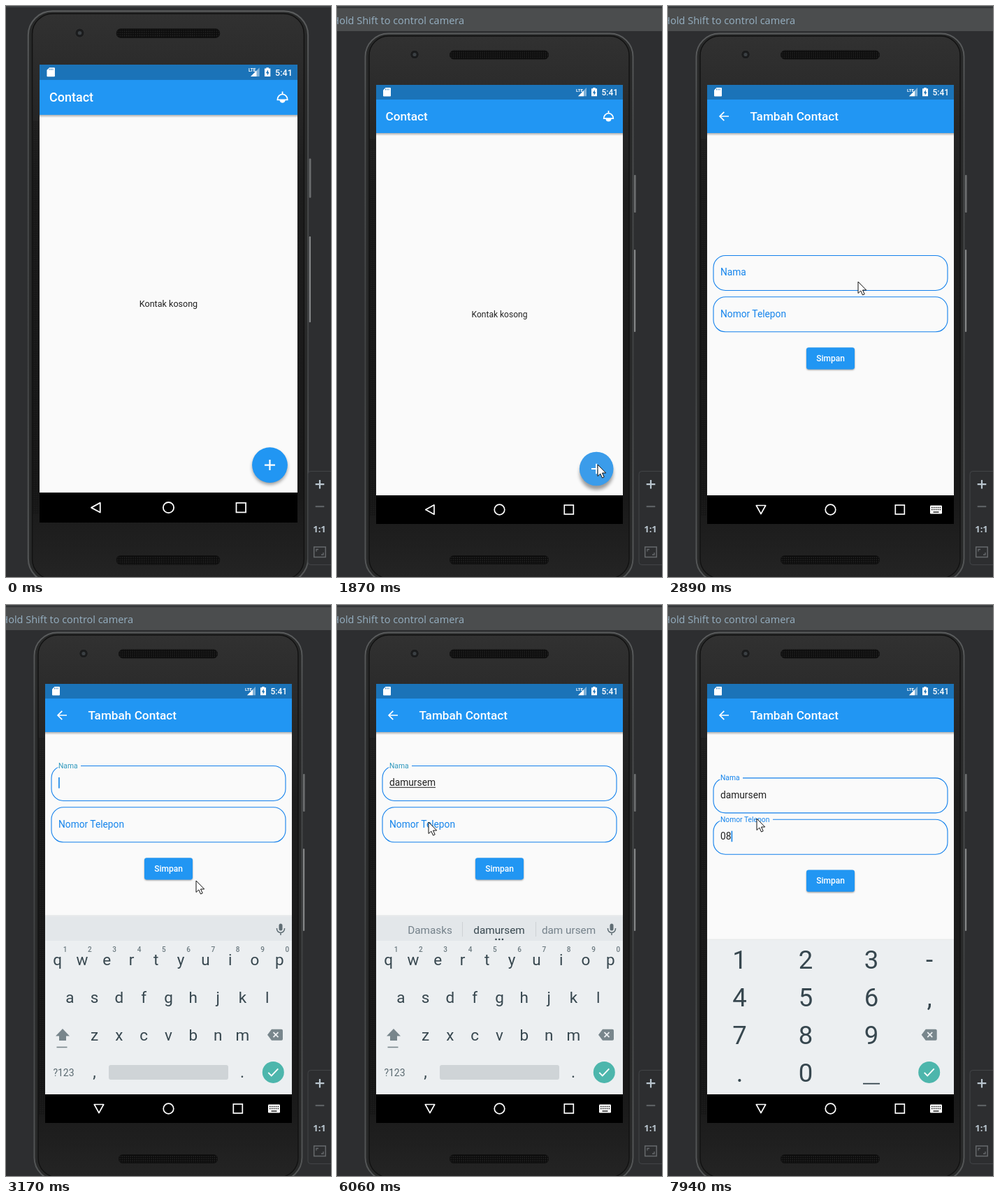
Write an HTML page that moves like this. It is 465x818 px and loops after 8000 ms.

```html
<!DOCTYPE html>
<html lang="id">
<head>
<meta charset="utf-8">
<title>Contact app</title>
<style>
html, body { margin: 0; width: 100%; height: 100%; overflow: hidden; background: #2d2e30; }
svg { display: block; width: 100vw; height: 100vh; font-family: Roboto, sans-serif; }
.mid { text-anchor: middle; }
.bold { font-weight: 500; }
.title { font-size: 17.18px; font-weight: 500; fill: #fff; }
.input { font-size: 13.75px; fill: #212121; }
.line { fill: none; stroke: #fff; stroke-width: 1.7; }
.ui { font-family: 'Open Sans', sans-serif; }
</style>
</head>
<body>
<svg viewBox="0 0 465 818" xmlns="http://www.w3.org/2000/svg">
<defs>
  <linearGradient id="body" x1="0" y1="0" x2="0" y2="1">
    <stop offset="0" stop-color="#313131"/><stop offset=".1" stop-color="#2b2b2b"/>
    <stop offset=".3" stop-color="#1d1d1d"/><stop offset=".85" stop-color="#191919"/><stop offset="1" stop-color="#242424"/>
  </linearGradient>
  <linearGradient id="rim" x1="0" y1="0" x2="0" y2="1">
    <stop offset="0" stop-color="#5a5c5d"/><stop offset=".15" stop-color="#4a4c4d"/>
    <stop offset=".6" stop-color="#404243"/><stop offset="1" stop-color="#545657"/>
  </linearGradient>
  <linearGradient id="fade" x1="0" y1="0" x2="0" y2="1">
    <stop offset="0" stop-color="#000" stop-opacity=".3"/><stop offset="1" stop-color="#000" stop-opacity="0"/>
  </linearGradient>
  <pattern id="dots" width="3" height="3" patternUnits="userSpaceOnUse">
    <rect width="3" height="3" fill="#0c0c0c"/><rect x=".5" y=".5" width="1.4" height="1.4" fill="#2a2a2a"/>
  </pattern>
  <filter id="soft" x="-30%" y="-30%" width="160%" height="170%"><feGaussianBlur stdDeviation="2.6"/></filter>
  <filter id="soft1" x="-10%" y="-20%" width="120%" height="150%"><feGaussianBlur stdDeviation="1"/></filter>
  <clipPath id="app"><rect x="56" y="113" width="353" height="588"/></clipPath>
  <g id="bar">
    <rect x="56" y="113" width="353" height="588" fill="#fafafa"/>
    <rect x="56" y="182" width="353" height="4" fill="url(#fade)"/>
    <rect x="56" y="133" width="353" height="49" fill="#2196f3"/>
    <rect x="56" y="113" width="353" height="21" fill="#1b73b8"/>
  </g>
  <g id="erase">
    <path d="M-11 0L-5-8H9Q11-8 11-6V6Q11 8 9 8H-5Z" fill="#78868c"/>
    <path d="M-2.5-3.5L4.5 3.5M4.5-3.5L-2.5 3.5" stroke="#eceff1" stroke-width="1.8"/>
  </g>
  <g id="done">
    <circle r="15.5" fill="#4db6ac"/>
    <path d="M-7 .5L-2.5 5L7-5" fill="none" stroke="#fff" stroke-width="1.9"/>
  </g>
</defs>

<rect width="465" height="818" fill="#2d2e30"/>
<rect width="465" height="2" fill="#3d4042"/>
<g id="hint">
  <rect y="3" width="465" height="33" fill="#4b4d4e"/>
  <text x="182" y="26" text-anchor="end" font-size="14.5" fill="#96b0c2" class="ui">Hold Shift to control camera</text>
</g>

<g id="phone">
  <rect x="425" y="242" width="2.6" height="54" rx="1" fill="#6c6e6f"/>
  <rect x="425" y="349" width="2.2" height="118" rx="1" fill="#858788"/>
  <rect x="40.5" y="39.5" width="383" height="785" rx="33" fill="#282929" stroke="url(#rim)" stroke-width="2"/>
  <rect x="46" y="43" width="372" height="777" rx="28" fill="url(#body)" stroke="#121212" stroke-width="1.4"/>
  <rect x="47" y="190" width="8" height="540" fill="url(#dots)" opacity=".3"/>
  <circle cx="111" cy="69.5" r="6.3" fill="#1b1c1d" stroke="#343434"/>
  <circle cx="111" cy="69.5" r="2.6" fill="#3b4044"/>
  <rect x="161.5" y="64" width="141" height="12" rx="5.5" fill="url(#dots)" stroke="#111"/>
  <rect x="161.5" y="787.5" width="141" height="12" rx="5.5" fill="url(#dots)" stroke="#111"/>

  <g clip-path="url(#app)">
    <g id="home">
      <use href="#bar"/>
      <text x="69.5" y="164" class="title">Contact</text>
      <path d="M388.500 150V153M381.700 161.200A6.800 7.600 0 0 1 395.300 161.200Z" class="line"/>
      <path d="M384.500 161.500H392.500A4 4 0 0 1 384.500 161.500Z" fill="#fff"/>
      <text x="232.5" y="445.5" class="mid" font-size="12.03" fill="#212121">Kontak kosong</text>
      <circle id="fabShade" cx="371.2" cy="666" r="24" fill="#000" opacity=".38" filter="url(#soft)"/>
      <circle cx="371.2" cy="663" r="24.3" fill="#2196f3"/>
      <circle id="ripple" cx="371.2" cy="663" fill="#b0b8c0"/>
      <path d="M371.200 655.800V670.200M364 663H378.400" stroke="#fff" stroke-width="2.1"/>
    </g>
    <g id="form">
      <use href="#bar"/>
      <path d="M87 158H74.500M80.300 151.800L74.100 158L80.300 164.200" class="line"/>
      <text x="117.6" y="164" class="title">Tambah Contact</text>
      <g id="fields"></g>
    </g>
    <g id="letters"></g>
    <g id="digits"></g>
  </g>

  <g fill="#fff">
    <path d="M69.500 117H76Q77 117 77 118V128.500Q77 129.500 76 129.500H67Q66 129.500 66 128.500V120.500Z"/>
    <path d="M69.500 118.500V120.500M71.800 118.500V120.500M74.100 118.500V120.500" stroke="#1b73b8" stroke-width=".9"/>
    <text x="342" y="122.5" font-size="6.2" font-weight="700">LTE</text>
    <path d="M357 117V129.200H345Z" opacity=".45"/>
    <path d="M353 121.200V129.200H345Z"/>
    <path d="M366.300 117H369.700V118.200H372V129.300H364V118.200H366.300Z"/>
    <path d="M368.800 120L365.800 124.700H367.700V128L370.400 123.400H368.800Z" fill="#1b73b8"/>
    <text x="378.5" y="128" font-size="12" class="bold">5:41</text>
  </g>

  <rect x="56" y="701" width="353" height="41" fill="#000"/>
  <path id="back" d="M126.800 721.500L139 714.800V728.200Z" class="line" stroke-linejoin="round"/>
  <circle cx="232.5" cy="721.5" r="7.3" class="line"/>
  <rect x="325.3" y="715" width="13" height="13" class="line"/>
  <g id="kbIcon">
    <rect x="375" y="715.5" width="17" height="12" rx="1.3" fill="#fff"/>
    <path d="M377 718.500H390.500M377 721.500H390.500" stroke="#000" stroke-width="1.5" stroke-dasharray="1.5 1.4"/>
    <path d="M379.500 725H387.500" stroke="#000" stroke-width="1.3"/>
  </g>
</g>

<g fill="none">
  <rect x="432" y="666.5" width="40" height="134" rx="4" fill="#2d2e30" stroke="#424447"/>
  <path d="M449 679V691.500M442.700 685.200H455.300" stroke="#bac6cf" stroke-width="2.2"/>
  <path d="M442.700 717H455.300" stroke="#5d6164" stroke-width="2.2"/>
  <text x="448.5" y="754.3" class="mid ui" font-size="13" font-weight="700" fill="#bac6cf">1:1</text>
  <rect x="440.7" y="775" width="16.5" height="14.5" stroke="#66696c" stroke-width="1.5"/>
  <path d="M444 781.500V778.500H447M454 783V786H451" stroke="#66696c" stroke-width="1.3"/>
</g>
<path id="mouse" d="M0 0V16.500L3.800 13L6.500 19L9.200 17.800L6.500 12H11.700Z" fill="#fff" stroke="#111" stroke-width="1"/>
</svg>

<script>
const $ = id => document.getElementById(id);
const NS = 'http://www.w3.org/2000/svg';
const LOOP = 8000;

function add(parent, tag, attrs, text) {
  const el = document.createElementNS(NS, tag);
  for (const k in attrs) el.setAttribute(k, attrs[k]);
  if (text) el.textContent = text;
  return parent.appendChild(el);
}
const label = (p, x, y, size, text, fill = '#37474f', more = {}) =>
  add(p, 'text', { x, y, class: 'mid', 'font-size': size, fill, ...more }, text);
const icon = (p, id, x, y) => add(p, 'use', { href: '#' + id, transform: `translate(${x} ${y})` });

// Letter keyboard
const abc = $('letters');
add(abc, 'rect', { x: 56, y: 444, width: 353, height: 2, fill: '#e9ebec' });
add(abc, 'rect', { x: 56, y: 446, width: 353, height: 255, fill: '#eceff1' });
add(abc, 'rect', { x: 56, y: 446, width: 353, height: 35, fill: '#e3e7ea' });
['qwertyuiop', 'asdfghjkl', 'zxcvbnm'].forEach((row, r) => {
  [...row].forEach((c, i) => {
    const x = [73.6, 91.3, 126.6][r] + 35.3 * i;
    label(abc, x, 516 + 54 * r, 22.5, c);
    if (!r) label(abc, x + 11, 496.5, 10, String((i + 1) % 10), '#6c7a80', { 'font-weight': 500 });
  });
});
add(abc, 'path', { d: 'M81 607L91 617.500H86V624H76V617.500H71Z', fill: '#78868c' });
add(abc, 'path', { d: 'M72.500 633.500H87.500', stroke: '#78868c', 'stroke-width': 1.6 });
icon(abc, 'erase', 385, 615.7);
label(abc, 82.5, 675, 14, '?123', '#5b6a71');
label(abc, 126.5, 677, 23, ',');
label(abc, 338, 677, 23, '.');
add(abc, 'rect', { x: 147, y: 659, width: 171, height: 21, rx: 3, fill: '#cfd4d7' });
icon(abc, 'done', 382.3, 669.4);
add(abc, 'rect', { x: 390.5, y: 456.5, width: 5, height: 10, rx: 2.5, fill: '#5f6d74' });
add(abc, 'path', { d: 'M387.500 463V464A5.500 5.500 0 0 0 398.500 464V463M393 469.500V473', fill: 'none', stroke: '#5f6d74', 'stroke-width': 1.5 });
const strip = add(abc, 'g', {});
add(strip, 'path', { d: 'M179.500 454V475M284.500 454V475', stroke: '#cdd2d5' });
for (const x of [227.5, 232.2, 236.9]) add(strip, 'circle', { cx: x, cy: 479, r: 1.3, fill: '#37474f' });
const hints = [133, 232, 331.5].map((x, i) => label(strip, x, 471, 15.3, '', i === 1 ? '#37474f' : '#74818a'));

// Number keyboard
const pad = $('digits');
add(pad, 'rect', { x: 56, y: 478.5, width: 353, height: 2, fill: '#e9ebec' });
add(pad, 'rect', { x: 56, y: 480, width: 353, height: 221, fill: '#eceff1' });
['123-', '456,', '789', '.0'].forEach((row, r) =>
  [...row].forEach((c, i) => label(pad, [102.5, 197, 291, 374][i], 520.7 + 54 * r, 36.5, c)));
add(pad, 'path', { d: 'M279 685.700H303', stroke: '#37474f', 'stroke-width': 1.8 });
icon(pad, 'erase', 373.7, 615.7);
icon(pad, 'done', 373.7, 669.4);

// Form fields, placed for a closed keyboard
const fields = $('fields');
function makeField(top, name, gap) {
  const g = add(fields, 'g', { transform: `translate(0 ${top})` });
  add(g, 'rect', { x: 65, y: 0, width: 335, height: 50, rx: 17.2, fill: 'none', stroke: '#1380ec', 'stroke-width': 1.1 });
  const cut = add(g, 'rect', { x: 72, y: -2, height: 4, fill: '#fafafa' });
  const tag = add(g, 'text', { 'font-size': 13.75 }, name);
  const text = add(g, 'text', { x: 75, y: 28.7, class: 'input' });
  const under = add(g, 'rect', { x: 75, y: 30.3, height: 1, fill: '#212121' });
  const caret = add(g, 'rect', { y: 16.4, width: 1.8, height: 15.6, fill: '#2a8fea' });
  return s => {
    cut.setAttribute('width', gap * s.up);
    tag.setAttribute('transform', `translate(75 ${28.7 - 25.2 * s.up}) scale(${1 - .25 * s.up})`);
    tag.setAttribute('fill', s.color || '#1484ec');
    if (text.textContent !== s.value) text.textContent = s.value;
    const w = s.value ? text.getComputedTextLength() : 0;
    under.setAttribute('width', s.under ? w : 0);
    caret.setAttribute('x', 75 + w);
    show(caret, s.caret);
  };
}
const nameField = makeField(357.5, 'Nama', 35);
const telField = makeField(416.8, 'Nomor Telepon', 78);
add(fields, 'rect', { x: 198, y: 490.5, width: 69, height: 31, rx: 3.4, fill: '#000', opacity: .38, filter: 'url(#soft1)' });
add(fields, 'rect', { x: 198, y: 489.2, width: 69, height: 31.2, rx: 3.4, fill: '#2196f3' });
label(fields, 232.5, 509, 12.03, 'Simpan', '#fff', { 'font-weight': 500 });

// Timeline
const NAME = 'damursem';
const keys = [3700, 3860, 4010, 4170, 4650, 4850, 4990, 5190];
const guesses = [
  [3780, 'do', 'd', 'did'], [3940, 'day', 'da', 'fa'], [4090, 'dame', 'dam', 'ham'],
  [4310, 'dams', 'damu', 'Dame'], [4720, 'damper', 'damur', 'dam ur'],
  [5050, 'Dampers', 'damurse', 'dam urse'], [5250, 'Damasks', NAME, 'dam ursem']
];
const path = [
  [440, 466, 712], [620, 432, 690], [860, 380, 662], [1000, 373, 657], [2290, 373, 657], [2520, 325, 520], [2800, 272, 395],
  [5640, 272, 395], [5900, 121, 248], [5930, 121, 248], [6060, 131, 311], [6870, 131, 311], [7010, 127, 306]
];

const clamp = x => Math.min(1, Math.max(0, x));
const span = (t, a, b) => clamp((t - a) / (b - a));
const easeOut = x => 1 - (1 - x) ** 3;
const show = (el, on) => el.setAttribute('display', on ? 'inline' : 'none');
const count = (list, t) => list.filter(k => t >= k).length;

function mouseAt(t) {
  const i = path.findIndex(p => p[0] > t);
  if (i < 0) return path[path.length - 1].slice(1);
  const a = path[i - 1], b = path[i], k = span(t, a[0], b[0]);
  return [a[1] + (b[1] - a[1]) * k, a[2] + (b[2] - a[2]) * k];
}

function draw(t) {
  const small = t >= 1130;
  show($('hint'), small);
  $('phone').setAttribute('transform', small ? '' : 'matrix(1.0453 0 0 1.0429 -10.54 -33.85)');

  show($('mouse'), t >= 440);
  if (t >= 440) $('mouse').setAttribute('transform', `translate(${mouseAt(t)})`);

  const press = span(t, 1660, 1870);
  $('ripple').setAttribute('r', 8 + 16.3 * press);
  $('ripple').setAttribute('opacity', t >= 1660 ? .06 + .12 * press : 0);
  $('fabShade').setAttribute('cy', 666 + 3 * press);

  const open = span(t, 1930, 2270);
  show($('form'), open > 0);
  $('form').setAttribute('opacity', open ** 1.5);
  $('form').setAttribute('transform', `translate(0 ${147 * (1 - easeOut(open))})`);

  const keyboard = t >= 2880, numeric = t >= 6330;
  $('back').setAttribute('transform', keyboard ? 'rotate(-90 133 721.5)' : '');
  show($('kbIcon'), keyboard);

  const rise = easeOut(span(t, 2950, 3170));
  show(abc, rise > 0 && !numeric);
  abc.setAttribute('opacity', rise);
  abc.setAttribute('transform', `translate(0 ${90 * (1 - rise)})`);
  show(pad, numeric);
  const shift = t >= 6470 ? -109.6 : t >= 3030 ? -127 : 0;
  fields.setAttribute('transform', `translate(0 ${shift})`);

  const typed = count(keys, t), guess = count(guesses.map(g => g[0]), t);
  show(strip, t >= 3780);
  hints.forEach((h, i) => { h.textContent = guess ? guesses[guess - 1][i + 1] : ''; });

  nameField({
    up: easeOut(span(t, 2960, 3130)),
    color: t >= 2960 && !numeric ? '#2f98bd' : null,
    value: NAME.slice(0, typed),
    under: guess && !numeric && guesses[guess - 1][2].length === typed,
    caret: (t >= 2960 && t < 3370) || (t >= 3700 && t < 5650)
  });
  telField({
    up: easeOut(span(t, 6420, 6620)),
    value: '08'.slice(0, count([7680, 7940], t)),
    caret: (t >= 6420 && t < 6880) || t >= 7410
  });
}

function tick(now) {
  draw(now % LOOP);
  requestAnimationFrame(tick);
}
draw(0);
requestAnimationFrame(tick);
</script>
</body>
</html>
```
